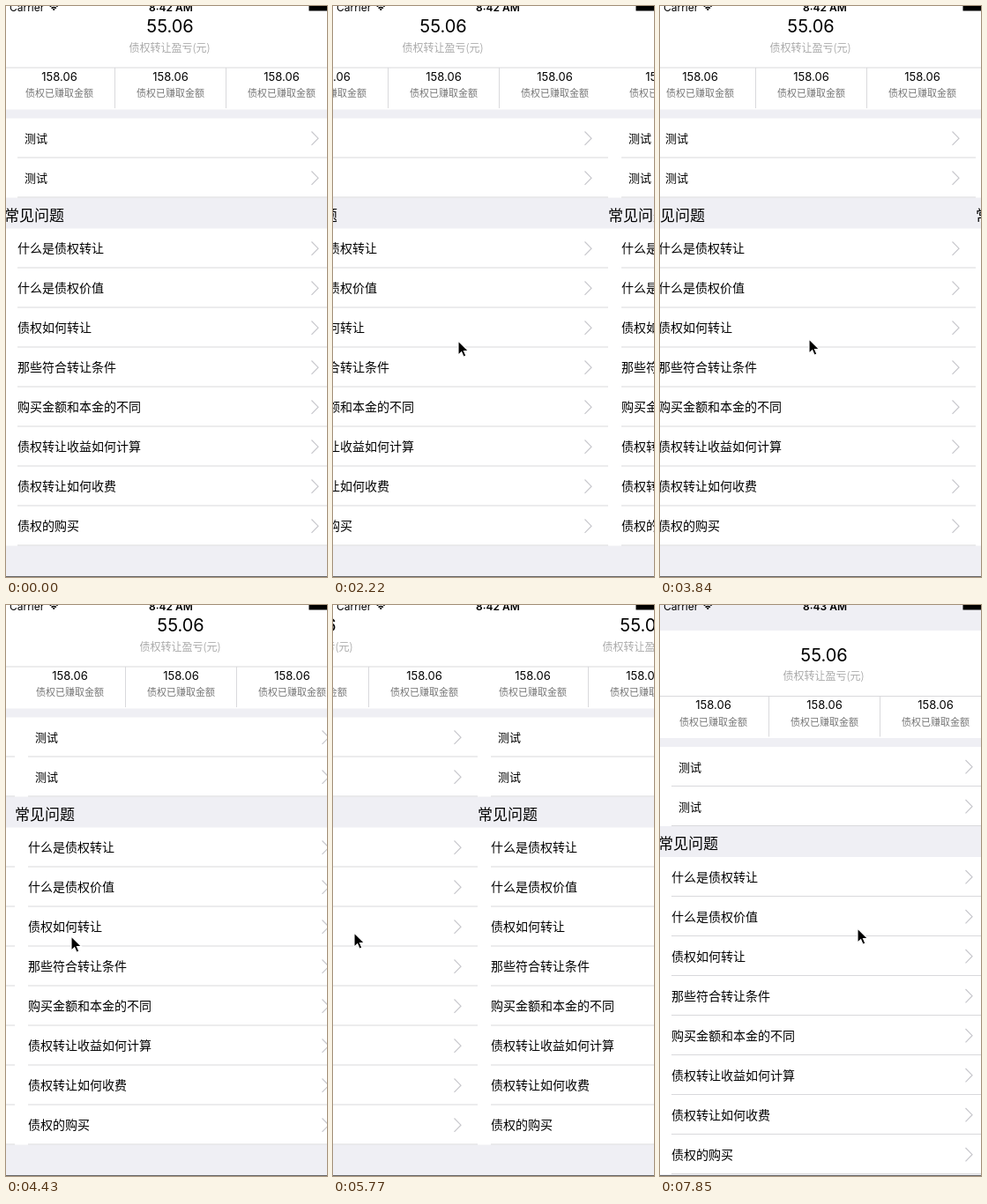
An HTML page for the animation above (8000 ms loop, 364 by 648 pixels).

```html
<!DOCTYPE html>
<html lang="zh-CN">
<head>
<meta charset="utf-8">
<style>
  html, body { margin: 0; width: 100%; height: 100%; overflow: hidden; background: #efeff4; }
  svg { display: block; width: 100%; height: 100%; }
  text { font-family: "Noto Sans CJK SC", "Noto Sans CJK", sans-serif; }
  .num { font-family: Inter, Roboto, sans-serif; }
  .mid { text-anchor: middle; }
</style>
</head>
<body>
<svg viewBox="0 0 364 648">
  <defs><g id="page"></g></defs>
  <rect width="364" height="648" fill="#efeff4"/>
  <use id="pageA" href="#page"/>
  <use id="pageB" href="#page"/>
  <g id="status">
    <text class="num" x="4" y="6" font-size="12">Carrier</text>
    <g fill="none" stroke="#000" stroke-width="1.7">
      <path d="M49.8 0.6a6.2 6.2 0 0 1 8.8 0M51.6 2.7a3.7 3.7 0 0 1 5.2 0"/>
    </g>
    <path d="M52.7 3.7L54.2 5.3L55.7 3.7A2.1 2.1 0 0 0 52.7 3.7Z"/>
    <text id="clock" class="num mid" x="187" y="6" font-size="12" font-weight="600"></text>
    <rect x="343.5" y="-3" width="24" height="8.5"/>
  </g>
  <rect y="647" width="364" height="1" fill="#666"/>
  <path id="cursor" d="M0 0V16.2L3.7 12.7L6.1 18.2L8.9 17L6.5 11.6H11.6Z" fill="#000" stroke="#fff" stroke-width="1.1"/>
</svg>
<script>
const $ = id => document.getElementById(id);
const LOOP = 8000, PAGE = 375, LEFT = -2, STEP = 146;
const LINE = '#d9d9dc';

const rect = (x, y, w, h, fill) => `<rect x="${x}" y="${y}" width="${w}" height="${h}" fill="${fill}"/>`;
const text = (x, y, size, str, cls = '', fill = '#000') =>
  `<text x="${x}" y="${y}" font-size="${size}" class="${cls}" fill="${fill}">${str}</text>`;

function rows(top, labels, x, size) {
  return rect(LEFT, top, PAGE, labels.length * 45, '#fff') + labels.map((label, i) => {
    const y = top + i * 45;
    return text(x, y + 27.5, size, label) +
      `<path d="M346.5 ${y + 15}l7.5 7.7l-7.5 7.7" fill="none" stroke="#c7c7cc" stroke-width="1.2"/>` +
      rect(13, y + 44, 360, 1, LINE);
  }).join('');
}

function buildPage() {
  let out = rect(LEFT, -4.5, PAGE, 122, '#fff') +
    text(186, 30, 20, '55.06', 'num mid') +
    text(185.5, 51.5, 12, '债权转让盈亏(元)', 'mid', '#aaa') +
    rect(LEFT, 69.5, PAGE, 1, LINE);
  for (let i = 0; i < 3; i++) {
    const x = 60.5 + i * 126;
    out += text(x, 84.5, 13, '158.06', 'num mid') +
      text(x, 103, 11, '债权已赚取金额', 'mid', '#777');
    if (i) out += rect(x - 63.5, 70, 1, 46, LINE);
  }
  return out + rows(127.5, ['测试', '测试'], 21, 13) +
    text(-2, 243.5, 17, '常见问题') +
    rows(252.5, ['什么是债权转让', '什么是债权价值', '债权如何转让', '那些符合转让条件',
      '购买金额和本金的不同', '债权转让收益如何计算', '债权转让如何收费', '债权的购买'], 13, 14);
}

// Screen refreshes come in bursts of short steps.
const bursts = [0, 900, 2070, 3240, 4430, 5180, 6360, 6660, 7850];
function snap(t) {
  const start = bursts.filter(b => b <= t).pop();
  return start + Math.floor((t - start + 5) / STEP) * STEP;
}

// Swipes: start, drag time, drag distance; then the page glides into place.
const swipes = [[880, 300, 100], [2010, 300, 89], [2892, 250, 119], [3797, 200, 110], [5394, 340, 169]];
function swiped(t, [start, time, dist]) {
  const u = t - start;
  if (u <= 0) return 0;
  if (u < time) return dist * u / time;
  const rest = (PAGE - dist) * Math.exp((time - u) / 140);
  return PAGE - (rest < 3 ? 0 : rest);
}

// Pointer path: time, x, y
const path = [
  [880, 260, 388], [1180, 160, 390], [2010, 203, 381], [2220, 141, 380], [2310, 114, 379],
  [2890, 155, 374], [3092, 60, 372], [3140, 50, 372], [3797, 184, 378], [3997, 74, 376],
  [5100, 74, 376], [5394, 193, 374], [5734, 24, 372], [6520, 24, 372], [6806, 62, 300],
  [7250, 182, 343], [7690, 222, 366], [7850, 224, 367]
];
function pointer(t) {
  const i = path.findIndex(p => p[0] > t);
  if (i < 0) return path[path.length - 1].slice(1);
  if (i === 0) return path[0].slice(1);
  const [a, b] = [path[i - 1], path[i]];
  const k = (t - a[0]) / (b[0] - a[0]);
  return [1, 2].map(j => a[j] + (b[j] - a[j]) * k);
}

function draw(time) {
  const t = snap(time);
  const [cx, cy] = pointer(t);
  const total = swipes.reduce((sum, s) => sum + swiped(t, s), 0);
  const x = -Math.round(total % PAGE);
  // Pulling past the top follows the pointer at half speed.
  const y = t > 6806 ? Math.round(cy - 300) / 2 : 0;
  $('pageA').setAttribute('transform', `translate(${x} ${y})`);
  $('pageB').setAttribute('transform', `translate(${x + PAGE} ${y})`);
  $('clock').textContent = t < 6050 ? '8:42 AM' : '8:43 AM';
  $('cursor').setAttribute('transform', `translate(${Math.round(cx)} ${Math.round(cy)})`);
  $('cursor').setAttribute('visibility', t < 900 ? 'hidden' : 'visible');
}

$('page').innerHTML = buildPage();
const origin = performance.now();
function tick() {
  draw((performance.now() - origin) % LOOP);
  requestAnimationFrame(tick);
}
tick();
</script>
</body>
</html>
```
